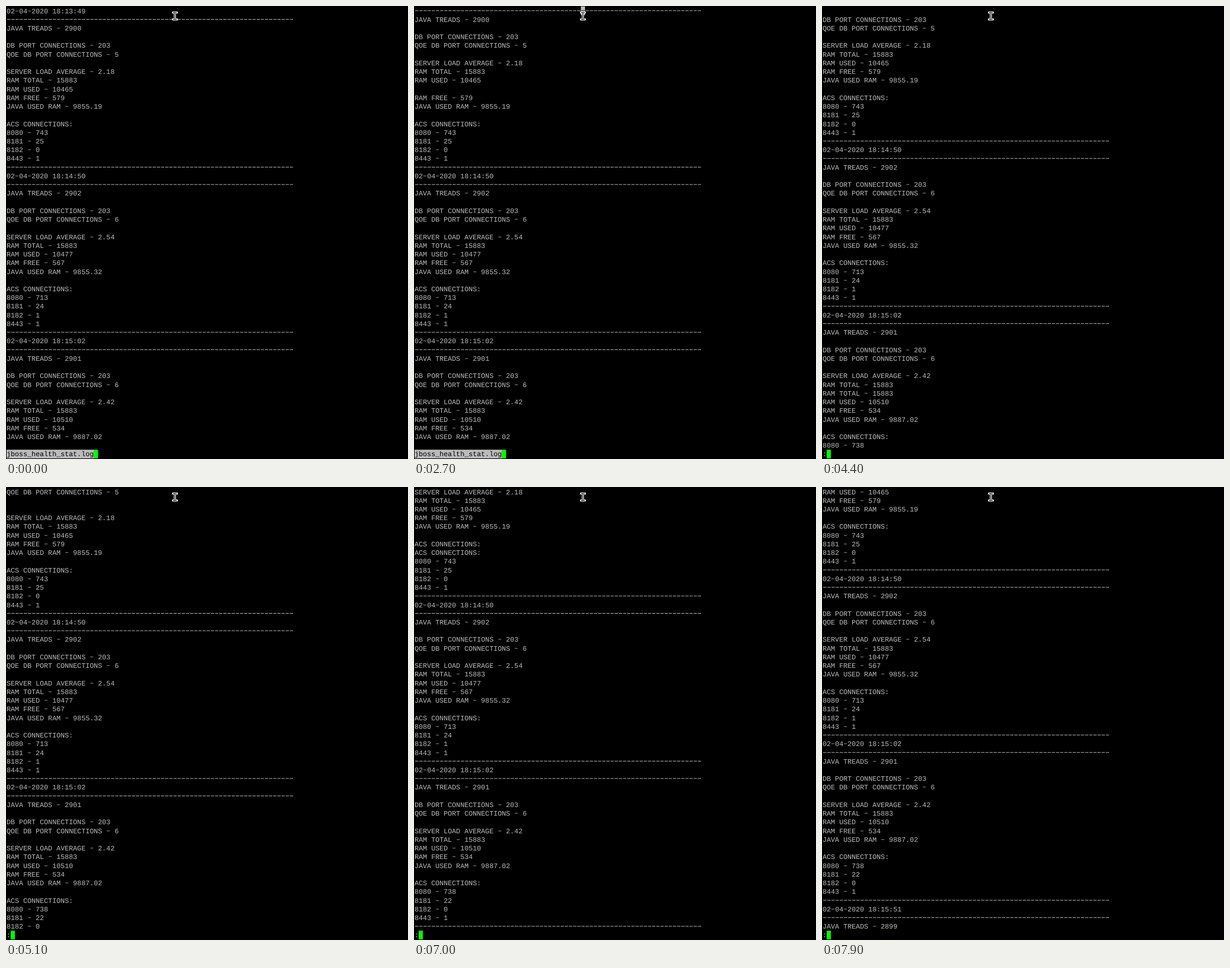
Animation, 705 px wide and 794 px high, one loop 8 s. Source, as an HTML page:

```html
<!DOCTYPE html>
<html lang="en">
<head>
<meta charset="utf-8">
<title>Health log in a terminal</title>
<style>
  html, body { margin: 0; width: 100%; height: 100%; overflow: hidden; background: #000; }
  svg { display: block; width: 705px; height: 794px; }
  text {
    font: 12.15px "Liberation Mono", "Courier New", monospace;
    white-space: pre;
    text-rendering: geometricPrecision;
  }
  .dash { baseline-shift: 1.2px; }
</style>
</head>
<body>
<svg id="stage" viewBox="0 0 705 794"></svg>
<script>
const LOOP = 8000;
const COL = 7.291, ROW = 15.235, LEFT = 1, TOP = 0.7;
const ROWS = 51, RULE_CHARS = 69, STAGE_WIDTH = 705;
const DASH = 5.7;
const GREY = '#bbb', GREEN = '#0f0';
const RULE = '-'.repeat(RULE_CHARS);
const stage = document.getElementById('stage');

const cellX = col => LEFT + col * COL;
const cellY = row => TOP + row * ROW;

function add(tag, attrs, parent = stage) {
  const node = document.createElementNS('http://www.w3.org/2000/svg', tag);
  for (const key in attrs) node.setAttribute(key, attrs[key]);
  return parent.appendChild(node);
}

const show = (node, on) => node.setAttribute('visibility', on ? 'visible' : 'hidden');

function addCells(col, row, count, fill, parent) {
  return add('rect', { x: cellX(col), y: cellY(row), width: count * COL, height: ROW, fill }, parent);
}

function addText(row, fill) {
  return add('text', { x: LEFT, y: cellY(row) + 11.8, fill });
}

function addRule(row, from, to, stroke, parent) {
  const y = cellY(row) + 7.5;
  return add('path', {
    d: `M${cellX(from) + 1} ${y}H${cellX(to)}`,
    stroke, 'stroke-width': 1, 'stroke-dasharray': `${DASH} ${COL - DASH}`
  }, parent);
}

function report(time, threads, qoe, load, used, free, javaRam, ports) {
  return [
    `02-04-2020 ${time}`, RULE, `JAVA TREADS - ${threads}`, '',
    'DB PORT CONNECTIONS - 203', `QOE DB PORT CONNECTIONS - ${qoe}`, '',
    `SERVER LOAD AVERAGE - ${load}`, 'RAM TOTAL - 15883',
    `RAM USED - ${used}`, `RAM FREE - ${free}`, `JAVA USED RAM - ${javaRam}`, '',
    'ACS CONNECTIONS:',
    ...[8080, 8181, 8182, 8443].map((port, i) => `${port} - ${ports[i]}`),
    RULE
  ];
}

const log = [
  ...report('18:13:49', 2900, 5, '2.18', 10465, 579, '9855.19', [743, 25, 0, 1]),
  ...report('18:14:50', 2902, 6, '2.54', 10477, 567, '9855.32', [713, 24, 1, 1]),
  ...report('18:15:02', 2901, 6, '2.42', 10510, 534, '9887.02', [738, 22, 0, 1]),
  '02-04-2020 18:15:51', RULE, 'JAVA TREADS - 2899'
];

// Rows above `split` already show offset `scroll`, the others still lag one line behind.
const scrolls = [
  { at: 0, scroll: 0 },
  { at: 2700, scroll: 1, split: 9, blank: 9 },
  { at: 2800, scroll: 1 },
  { at: 4000, scroll: 2, split: 2 },
  { at: 4300, scroll: 2 },
  { at: 4400, scroll: 3, split: 44 },
  { at: 4800, scroll: 4 },
  { at: 5100, scroll: 5, split: 2 },
  { at: 5400, scroll: 5 },
  { at: 6200, scroll: 6, split: 10 },
  { at: 6400, scroll: 6 },
  { at: 7000, scroll: 7, split: 7 },
  { at: 7200, scroll: 8, split: 13, blank: 13 },
  { at: 7400, scroll: 8 },
  { at: 7700, scroll: 9, split: 12, blank: 12 },
  { at: 7900, scroll: 9 }
];

const rows = Array.from({ length: ROWS }, (_, row) => ({
  text: addText(row, GREY),
  rule: addRule(row, 0, RULE_CHARS, GREY)
}));

// The terminal face has wide, high hyphens.
function setLine(row, line) {
  if (row.line === line) return;
  row.line = line;
  const isRule = line === RULE;
  row.text.innerHTML = isRule ? '' : line.replaceAll('-', '<tspan class="dash">–</tspan>');
  show(row.rule, isRule);
}

const dragged = add('g', {});
add('rect', { x: cellX(19), y: 0, width: STAGE_WIDTH - cellX(19), height: cellY(1), fill: GREY }, dragged);
addCells(0, 1, 41, GREY, dragged);
addRule(1, 0, 41, '#000', dragged);

const picked = add('g', {});
addCells(40, 0, 1, GREY, picked);
addRule(0, 40, 41, '#000', picked);

const fileName = 'jboss_health_stat.log';
const nameBar = addCells(0, ROWS, fileName.length, GREY);
const prompt = addText(ROWS, GREY);
const caret = addCells(0, ROWS, 1, GREEN);

const beam = 'M293 11.5H299.5M296.2 11.5V23.5M293 23.5H299.5';
add('path', { d: beam, fill: 'none', stroke: '#fff', 'stroke-width': 3.6, 'stroke-linecap': 'square' });
add('path', { d: beam, fill: 'none', stroke: '#000', 'stroke-width': 1.2 });

function render(t) {
  const { scroll, split = ROWS, blank } = scrolls.findLast(step => step.at <= t);
  rows.forEach((row, i) => {
    setLine(row, i === blank ? '' : log[i + scroll - (i < split ? 0 : 1)]);
  });

  show(dragged, t >= 1400 && t < 1500);
  show(picked, t >= 1500 && t < 4000);
  picked.setAttribute('transform', `translate(0 ${t < 2700 ? ROW : 0})`);

  const atName = t < 2800;
  const label = atName ? fileName : ':';
  show(nameBar, atName);
  prompt.textContent = label;
  prompt.setAttribute('fill', atName ? '#000' : GREY);
  caret.setAttribute('x', cellX(label.length));
}

const start = performance.now();
function frame() {
  render((performance.now() - start) % LOOP);
  requestAnimationFrame(frame);
}
render(0);
requestAnimationFrame(frame);
</script>
</body>
</html>
```
